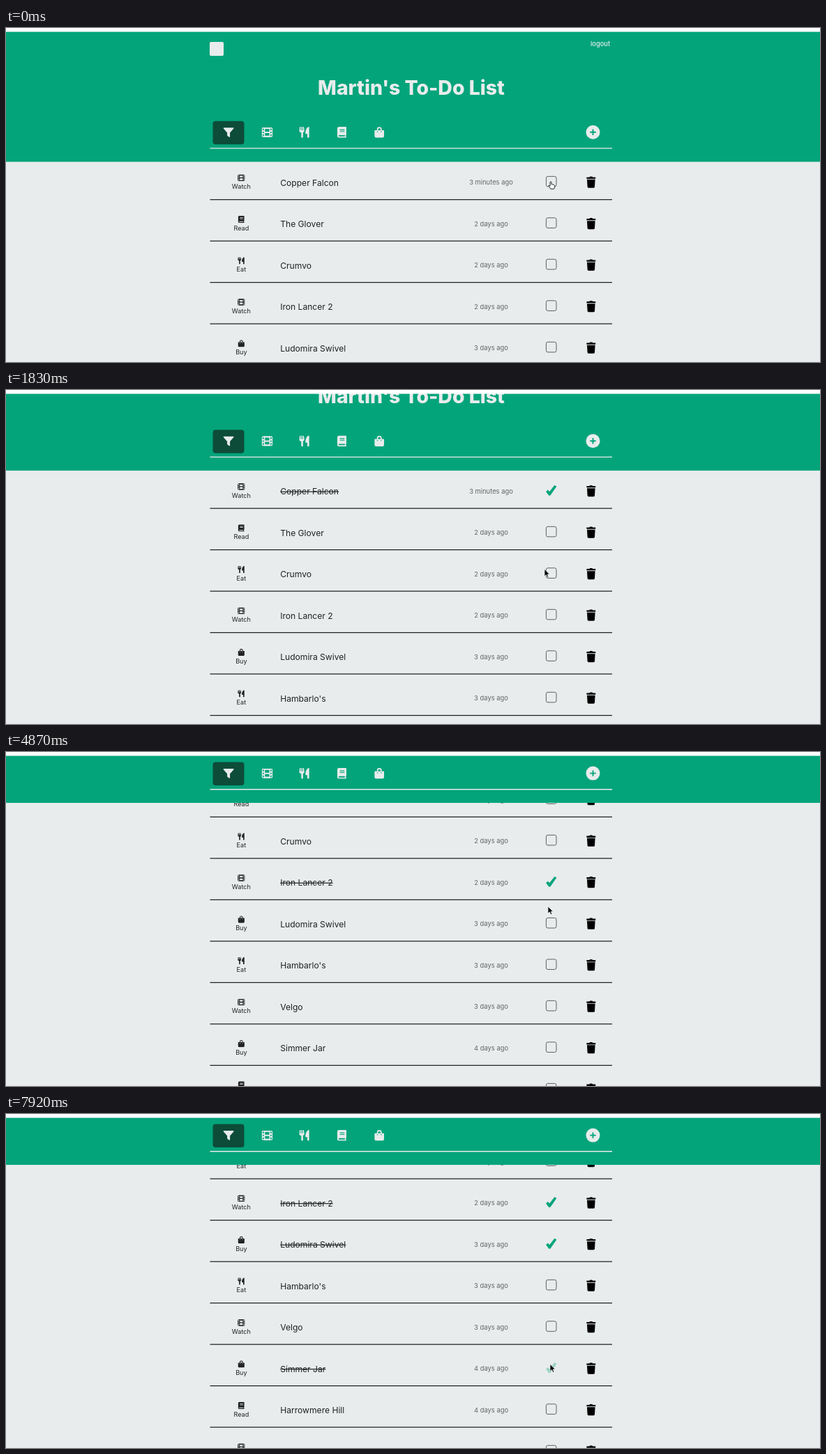
An HTML page for the animation above (8 s loop, 1167x480 px).

```html
<!DOCTYPE html>
<html lang="en">
<head>
<meta charset="utf-8">
<title>To-Do List</title>
<style>
  html, body { margin: 0; width: 100%; height: 100%; overflow: hidden; background: #e8ecec; }
  #stage { display: block; width: 100vw; height: 100vh; font-family: Inter, "Noto Sans", sans-serif; }
  .bar { fill: #04a47b; }
  .light { fill: #e8ecec; color: #e8ecec; }
  .title { font-size: 28.4px; font-weight: 800; }
  .logout { font-size: 9.3px; font-weight: 500; }
  .row { fill: #222; color: #222; }
  .kind { font-size: 9.1px; }
  .name { font-size: 12.1px; }
  .done .name { text-decoration: line-through; }
  .age { font-size: 9.4px; fill: #666; }
  .mid { text-anchor: middle; }
  .rule { stroke: #222; stroke-width: 1.25; }
  .box { fill: none; stroke: #606060; stroke-width: 1; }
  .tick { fill: #04a47b; opacity: 0; }
  .done .tick { opacity: 1; }
  .done .tick.fresh { opacity: .35; }
  .done .box { display: none; }
  .over #arrow, #hand { display: none; }
  .over #hand { display: inline; }
</style>
</head>
<body>
<svg id="stage" viewBox="0 0 1167 480" preserveAspectRatio="none">
  <defs>
    <symbol id="watch" viewBox="0 0 16 16">
      <rect x=".7" y="1.7" width="14.6" height="12.6" rx="1" fill="none" stroke="currentColor" stroke-width="1.4"/>
      <path d="M4 1v14M12 1v14" stroke="currentColor" stroke-width="1.6"/>
      <path d="M1 6h3M1 10h3M12 6h3M12 10h3M4 8h8" stroke="currentColor" stroke-width="2"/>
      <path d="M4 2h8M4 14h8" stroke="currentColor" stroke-width="2"/>
    </symbol>
    <symbol id="eat" viewBox="0 0 16 16">
      <path d="M1 0h1.2v5h1V0h1.3v5h1V0h1.3l.9 5.2a3 3 0 0 1-1.9 3.1V15a1 1 0 0 1-1 1h-.6a1 1 0 0 1-1-1V8.3A3 3 0 0 1 .2 5.2zM14.8 0v15a1 1 0 0 1-1 1h-.7a1 1 0 0 1-1-1v-4.5h-1.8a1 1 0 0 1-1-1C9.3 5 11.5 0 14.8 0z"/>
    </symbol>
    <symbol id="read" viewBox="0 0 16 16">
      <path fill-rule="evenodd" d="M4 0h9.700a.8.8 0 0 1 .8.8v10.700l-.6.9v1.700l.6.6v.5a.8.8 0 0 1-.8.8H4a2.800 2.800 0 0 1-2.800-2.800V2.800A2.800 2.800 0 0 1 4 0zM5 3.800v1.100h6.800V3.800zM5 6.200v1.100h6.800V6.200zM4 12.200a.9.9 0 0 0 0 1.900h8.400v-1.900z"/>
    </symbol>
    <symbol id="buy" viewBox="0 0 16 16">
      <path fill-rule="evenodd" d="M1 5h14v8.500a2.500 2.500 0 0 1-2.500 2.500h-9A2.500 2.500 0 0 1 1 13.500zM4.500 7.100a.8.8 0 1 0 1.600 0a.8.8 0 1 0-1.600 0zM9.900 7.100a.8.8 0 1 0 1.600 0a.8.8 0 1 0-1.600 0z"/>
      <path d="M5.300 6V3.700a2.700 2.700 0 0 1 5.400 0V6" fill="none" stroke="currentColor" stroke-width="1.700"/>
    </symbol>
    <path id="trash" d="M-6.400-7.500h4l.9-1h3l.9 1h4v2.300h-12.800zM-5.800-4.300h11.600l-.6 10.600a1.500 1.500 0 0 1-1.500 1.400h-7.400a1.500 1.500 0 0 1-1.500-1.400z"/>
    <path id="tick" d="M-7.600.8l2.800-2.300 2.300 2.400L4.700-8.300l3 1.600L-1.300 6.400l-2 .2z"/>
  </defs>

  <rect width="1167" height="480" fill="#e8ecec"/>
  <g id="list"></g>

  <g id="head" class="light">
    <rect class="bar" y="5" width="1167" height="187.300"/>
    <rect x="292" y="20" width="20" height="20" rx="2"/>
    <text class="logout" x="838" y="25.700">logout</text>
    <text class="title mid" x="581" y="95.800">Martin's To-Do List</text>
    <rect x="296.500" y="133.800" width="45" height="33.500" rx="4" fill="#0c4c39"/>
    <path d="M312.500 143.200h13.200a.8.8 0 0 1 .6 1.400l-5.200 5.900v5.800a.7.7 0 0 1-1.100.5l-2.500-1.900a1 1 0 0 1-.4-.8v-3.600l-5.200-5.900a.8.8 0 0 1 .6-1.400z"/>
    <g id="tabs"></g>
    <circle cx="841.500" cy="149.800" r="10"/>
    <path d="M837.300 149.800h8.400M841.500 145.600v8.400" stroke="#04a47b" stroke-width="1.900"/>
    <path d="M292.500 172.900H869" stroke="#e8ecec" stroke-width="1.400"/>
  </g>
  <rect width="1167" height="5.500" fill="#fff"/>

  <g id="cursor">
    <path id="arrow" d="M0 0v10.200l2.400-2.200 1.700 3.700 1.700-.8-1.600-3.500h3.100z" fill="#000" stroke="#fff" stroke-width=".7"/>
    <path id="hand" d="M-.9 1a1 1 0 0 1 1.900 0v3l1.700.3 1.700.5 1.200.9v2.500l-1 2.600h-4.800l-1.300-2.200-1.700-2.200q.3-1.200 1.500-.4l.8.7z" fill="#fff" stroke="#111" stroke-width=".9" stroke-linejoin="round"/>
  </g>
</svg>
<script>
const LOOP = 8000, REFRESH = 120, PHASE = 30, FADE = 130;
const TOP = 222, PITCH = 59.5, STICK = 119.2;
const $ = id => document.getElementById(id);

// kind, name, age, time of the click
const items = [
  ['Watch', 'Copper Falcon', '3 minutes', 80],
  ['Read', 'The Glover', '2 days'],
  ['Eat', 'Crumvo', '2 days'],
  ['Watch', 'Iron Lancer 2', '2 days', 2840],
  ['Buy', 'Ludomira Swivel', '3 days', 5760],
  ['Eat', "Hambarlo's", '3 days'],
  ['Watch', 'Velgo', '3 days'],
  ['Buy', 'Simmer Jar', '4 days', 7920],
  ['Read', 'Harrowmere Hill', '4 days'],
  ['Watch', 'Night Orchard', '4 days']
];

// Gestures: start, end, where they come to rest
const swipes = [
  [720, 1830, 76.5], [1830, 2190, 167], [3930, 4420, 202],
  [4420, 4870, 213], [4870, 5310, 226.5], [6600, 7500, 272.5]
];
const moves = [
  [300, 480, 772, 257.5], [2010, 2540, 781, 236], [2900, 3220, 777, 280],
  [3220, 3590, 777, 208], [4420, 4870, 777, 222], [5450, 5700, 781, 233],
  [5850, 6400, 771.5, 328], [7050, 7700, 780, 359.5]
];

const easeOut = u => 1 - (1 - u) ** 2;

// Runs through the gestures, each easing from the last rest to the next
const glide = (rest, gestures, t) => gestures.reduce((pos, [start, end, ...to]) => {
  const k = easeOut(Math.min(1, Math.max(0, (t - start) / (end - start))));
  return pos.map((p, i) => p + (to[i] - p) * k);
}, rest);

const icon = (id, x, y, size) =>
  `<use href="#${id}" x="${x - size / 2}" y="${y - size / 2}" width="${size}" height="${size}"/>`;

$('tabs').innerHTML = ['watch', 'eat', 'read', 'buy']
  .map((id, i) => icon(id, 374.4 + 53.6 * i, 149.9, 15.6)).join('');

$('list').innerHTML = items.map(([kind, name, age], i) => `
  <g class="row" transform="translate(0 ${TOP + i * PITCH})">
    ${icon(kind.toLowerCase(), 337.3, -6.6, 10.4)}
    <text class="kind mid" x="337.4" y="9.4">${kind}</text>
    <text class="name" x="393.2" y="4.7">${name}</text>
    <text class="age mid" x="695.5" y="3.4">${age} ago</text>
    <rect class="box" x="774.4" y="-8.7" width="14.6" height="14.6" rx="2.5"/>
    <use class="tick" href="#tick" x="781.7" y="-.4"/>
    <use href="#trash" x="838.8" fill="#000"/>
    <path class="rule" d="M292.5 24.7H869"/>
  </g>`).join('');
const rows = [...$('list').children];

const shift = (id, x, y) => $(id).setAttribute('transform', `translate(${x} ${y})`);

function draw(time) {
  const t = Math.floor((time - PHASE) / REFRESH) * REFRESH + PHASE;
  const [scroll] = glide([0], swipes, t);
  const [x, y] = glide([781, 220.5], moves, t);
  shift('list', 0, -scroll);
  shift('head', 0, -Math.min(scroll, STICK));
  shift('cursor', x, y);

  let over = false;
  rows.forEach((row, i) => {
    const click = items[i][3], done = time >= click;
    row.classList.toggle('done', done);
    row.querySelector('.tick').classList.toggle('fresh', time < click + FADE);
    const dy = y - (TOP + i * PITCH - scroll);
    over ||= !done && x > 774 && x < 790 && dy > -9 && dy < 6.5;
  });
  $('cursor').classList.toggle('over', over);
}

const start = performance.now();
(function loop() {
  draw((performance.now() - start) % LOOP);
  requestAnimationFrame(loop);
})();
</script>
</body>
</html>
```
